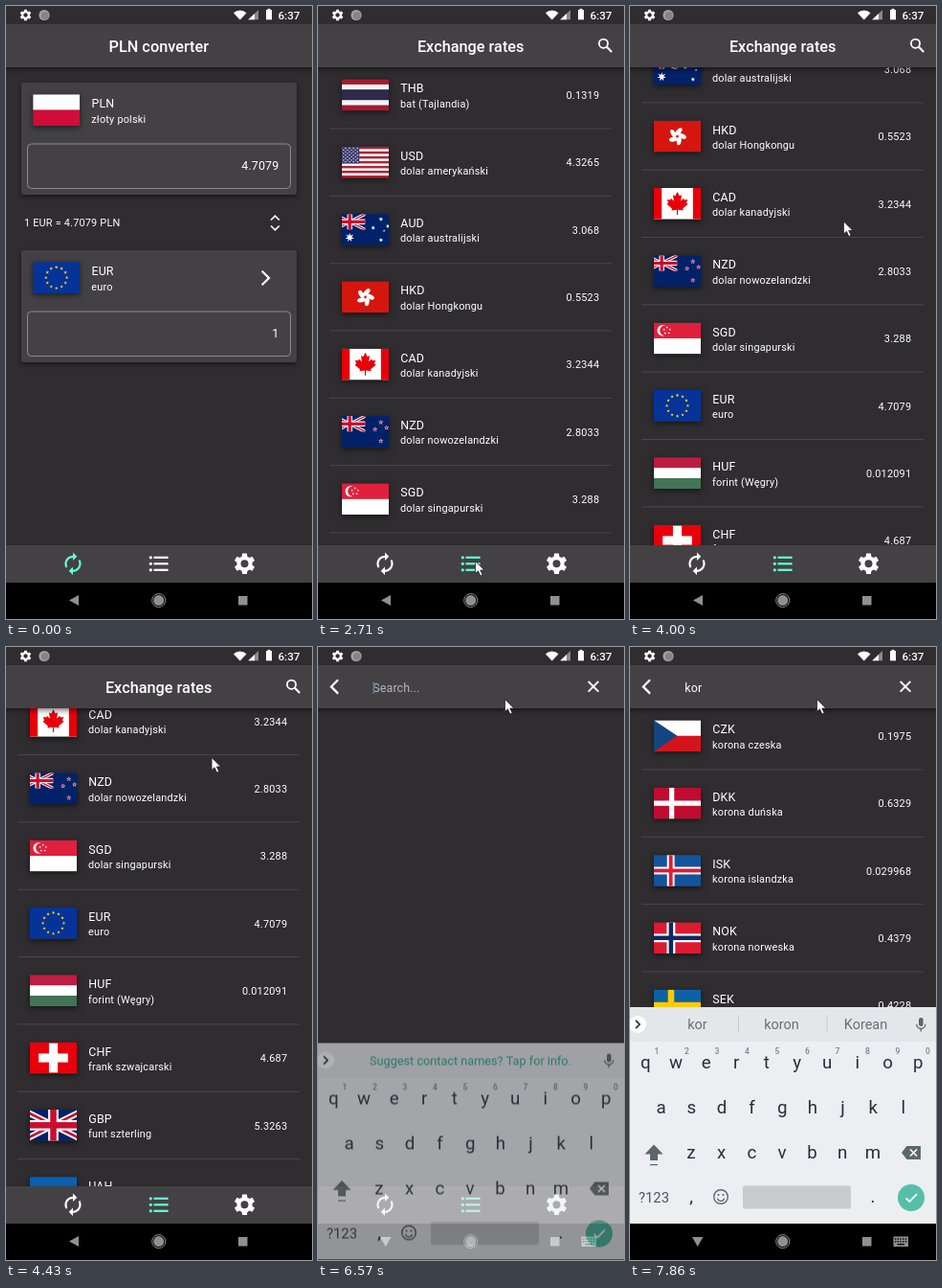
An HTML page with a canvas for the animation above (8 s loop, 320 by 640 pixels).

```html
<!DOCTYPE html>
<html lang="en">
<head>
<meta charset="utf-8">
<title>Currency converter</title>
<style>
html, body { margin: 0; width: 100%; height: 100%; overflow: hidden; background: #2f2d30; }
canvas { display: block; width: 320px; height: 640px; }
</style>
</head>
<body>
<canvas id="stage"></canvas>
<script>
const ratio = window.devicePixelRatio || 1;
function prepare(canvas) {
  canvas.width = 320 * ratio;
  canvas.height = 640 * ratio;
  const context = canvas.getContext('2d');
  context.scale(ratio, ratio);
  return context;
}
const layer = prepare(document.createElement('canvas'));
let ctx = prepare(document.getElementById('stage'));

const BG = '#2f2d30', PANEL = '#434143', ACCENT = '#64ffda', SOFT = '#b7b6b7', GREY = '#909090';
const DURATION = 8000, FPS = 7;

// Drawing helpers
function rect(x, y, w, h, color) {
  ctx.fillStyle = color;
  ctx.fillRect(x, y, w, h);
}
function roundRect(x, y, w, h, r, fill, stroke) {
  ctx.beginPath();
  ctx.roundRect(x, y, w, h, r);
  if (fill) { ctx.fillStyle = fill; ctx.fill(); }
  if (stroke) { ctx.strokeStyle = stroke; ctx.lineWidth = 1; ctx.stroke(); }
}
function disc(x, y, r, color) {
  ctx.beginPath();
  ctx.arc(x, y, r, 0, 7);
  ctx.fillStyle = color;
  ctx.fill();
}
function ring(x, y, r, width, color) {
  ctx.beginPath();
  ctx.arc(x, y, r, 0, 7);
  ctx.strokeStyle = color;
  ctx.lineWidth = width;
  ctx.stroke();
}
function trace(points) {
  ctx.beginPath();
  points.forEach(([x, y]) => ctx.lineTo(x, y));
}
function poly(points, color) {
  trace(points);
  ctx.closePath();
  ctx.fillStyle = color;
  ctx.fill();
}
function line(points, width, color = '#fff') {
  trace(points);
  ctx.strokeStyle = color;
  ctx.lineWidth = width;
  ctx.stroke();
}
function text(s, x, y, size, color = '#fff', align = 'left', weight = 400, spacing = 0) {
  ctx.font = `${weight} ${size}px Roboto, sans-serif`;
  ctx.letterSpacing = spacing + 'px';
  ctx.textAlign = align;
  ctx.fillStyle = color;
  ctx.fillText(s, x, y);
}
const bodyText = (s, x, y, color, align) => text(s, x, y, 12.45, color, align, 400, .12);
const smallText = (s, x, y, color, align) => text(s, x, y, 10.9, color, align, 400, .2);

function clipped(x, y, w, h, draw) {
  ctx.save();
  ctx.beginPath();
  ctx.rect(x, y, w, h);
  ctx.clip();
  draw();
  ctx.restore();
}
function shadowed(blur, draw) {
  ctx.save();
  ctx.shadowColor = 'rgba(0,0,0,.55)';
  ctx.shadowBlur = blur * ratio;
  ctx.shadowOffsetY = 2 * ratio;
  draw();
  ctx.restore();
}
// Draws a group opaquely, then blends it as a whole
function blended(alpha, dy, draw) {
  if (!alpha) return;
  const main = ctx;
  ctx = layer;
  ctx.clearRect(0, 0, 320, 640);
  draw();
  ctx = main;
  ctx.globalAlpha = alpha;
  ctx.drawImage(layer.canvas, 0, dy, 320, 640);
  ctx.globalAlpha = 1;
}
function star(x, y, r, tips, color, inner = .42) {
  poly(Array.from({ length: tips * 2 }, (_, i) => {
    const a = i * Math.PI / tips - Math.PI / 2, d = i % 2 ? r * inner : r;
    return [x + d * Math.cos(a), y + d * Math.sin(a)];
  }), color);
}

// Keys are [time, ...values]
function tween(keys, t) {
  if (t <= keys[0][0]) return keys[0].slice(1);
  for (let i = 1; i < keys.length; i++) {
    const [a, b] = [keys[i - 1], keys[i]];
    if (t <= b[0]) {
      const p = (t - a[0]) / (b[0] - a[0]);
      return a.slice(1).map((v, j) => v + (b[j + 1] - v) * p);
    }
  }
  return keys[keys.length - 1].slice(1);
}

// Flags fill a 48 x 32 box; wider or taller ones are cropped evenly
const W = 48, H = 32, FLAG_SCALE = 49 / W;
const bands = (...colors) => () =>
  colors.forEach((c, i) => rect(0, i * H / colors.length, W, H / colors.length + .1, c));
const nordic = (center, base, ...crosses) => () => {
  rect(0, 0, W, H, base);
  for (const [w, color] of crosses) {
    rect(center - w / 2, 0, w, H, color);
    rect(0, (H - w) / 2, W, w, color);
  }
};
function unionJack(x, w, h) {
  ctx.save();
  ctx.translate(x, 0);
  clipped(0, 0, w, h, () => {
    rect(0, 0, w, h, '#012169');
    for (const [size, color] of [[.2, '#fff'], [.08, '#c8102e']]) {
      line([[0, 0], [w, h]], h * size, color);
      line([[w, 0], [0, h]], h * size, color);
    }
    for (const [size, color] of [[.33, '#fff'], [.2, '#c8102e']]) {
      rect(0, h * (1 - size) / 2, w, h * size, color);
      rect((w - h * size) / 2, 0, h * size, h, color);
    }
  });
  ctx.restore();
}
const southern = draw => () => {
  rect(0, 0, W, H, '#012169');
  unionJack(-8, 32, 16);
  draw();
};
const flags = {
  PLN: bands('#fff', '#d00c38'),
  THB: bands('#a51931', '#f4f5f8', '#2d2a4a', '#2d2a4a', '#f4f5f8', '#a51931'),
  USD() {
    for (let i = 0; i < 13; i++) rect(0, i * H / 13, W, H / 13 + .1, i % 2 ? '#fff' : '#b22234');
    rect(0, 0, 17.9, H * 7 / 13, '#3c3b6e');
    for (let r = 0; r < 9; r++)
      for (let c = r % 2; c < 11; c += 2) disc(-4.4 + c * 2.03, 1.7 + r * 1.73, .65, '#fff');
  },
  AUD: southern(() => {
    star(8, 24, 4.8, 7, '#fff');
    [[40, 5.3], [32, 14.2], [47.1, 12.4], [40, 26.7]].forEach(([x, y]) => star(x, y, 2.3, 7, '#fff'));
    star(43.2, 17.3, 1.3, 5, '#fff');
  }),
  HKD() {
    rect(0, 0, W, H, '#d5160f');
    for (let i = 0; i < 5; i++) {
      const a = i * Math.PI * .4 - 1.3;
      ctx.beginPath();
      ctx.ellipse(24 + 5 * Math.cos(a), 16 + 5 * Math.sin(a), 4.5, 2.3, a + .5, 0, 7);
      ctx.fillStyle = '#fff';
      ctx.fill();
    }
  },
  CAD() {
    rect(0, 0, W, H, '#fff');
    rect(0, 0, 8, H, '#e8000b');
    rect(40, 0, 8, H, '#e8000b');
    const half = [[0, -12], [2.2, -7.8], [4.5, -9], [3.5, -2.5], [6.5, -5.5], [7.2, -3.8], [10.5, -4.3],
      [9.3, -.8], [10.8, .5], [5.5, 5], [6, 7], [.6, 6.3], [.6, 11.5]];
    const mirrored = half.map(([x, y]) => [-x, y]).reverse();
    poly([...half, ...mirrored].map(([x, y]) => [24 + x, 16 + y]), '#e8000b');
  },
  NZD: southern(() => {
    for (const [x, y] of [[40, 6.3], [34, 13.6], [45.8, 12], [40, 25.6]]) {
      star(x, y, 2.6, 5, '#fff');
      star(x, y, 1.8, 5, '#cc142b');
    }
  }),
  SGD() {
    bands('#e0203c', '#fff')();
    disc(9, 8, 5.6, '#fff');
    disc(11.2, 8, 5.2, '#e0203c');
    for (let i = 0; i < 5; i++) {
      const a = i * Math.PI * .4 - Math.PI / 2;
      star(13.4 + 3.2 * Math.cos(a), 8 + 3.2 * Math.sin(a), 1.3, 5, '#fff');
    }
  },
  EUR() {
    rect(0, 0, W, H, '#063398');
    for (let i = 0; i < 12; i++) {
      const a = i * Math.PI / 6;
      star(24 + 10.7 * Math.cos(a), 16 + 10.7 * Math.sin(a), 1.8, 5, '#ffd617');
    }
  },
  HUF: bands('#bd1e40', '#fff', '#437355'),
  CHF() {
    rect(0, 0, W, H, '#e8000b');
    rect(19.5, 1, 9, 30, '#fff');
    rect(9, 11.5, 30, 9, '#fff');
  },
  GBP: () => unionJack(-8, 64, H),
  UAH: bands('#0a5fb0', '#ffd500'),
  JPY() { rect(0, 0, W, H, '#fff'); disc(24, 16, 9.6, '#bc002d'); },
  CZK() {
    bands('#fff', '#d4141c')();
    poly([[0, 0], [24, 16], [0, 32]], '#14457f');
  },
  DKK: nordic(18.2, '#c00c30', [5.2, '#fff']),
  ISK: nordic(17.3, '#12549c', [7.7, '#fff'], [3.8, '#d91f35']),
  NOK: nordic(17.5, '#dc1a30', [8.7, '#fff'], [4.4, '#10275f']),
  SEK: nordic(17.6, '#0d62a6', [6.4, '#fecb00'])
};
const rates = [
  ['THB', 'bat (Tajlandia)', '0.1319'], ['USD', 'dolar amerykański', '4.3265'],
  ['AUD', 'dolar australijski', '3.068'], ['HKD', 'dolar Hongkongu', '0.5523'],
  ['CAD', 'dolar kanadyjski', '3.2344'], ['NZD', 'dolar nowozelandzki', '2.8033'],
  ['SGD', 'dolar singapurski', '3.288'], ['EUR', 'euro', '4.7079'],
  ['HUF', 'forint (Węgry)', '0.012091'], ['CHF', 'frank szwajcarski', '4.687'],
  ['GBP', 'funt szterling', '5.3263'], ['UAH', 'hrywna (Ukraina)', '0.1474'],
  ['JPY', 'jen (Japonia)', '0.034115'], ['CZK', 'korona czeska', '0.1975'],
  ['DKK', 'korona duńska', '0.6329'], ['ISK', 'korona islandzka', '0.029968'],
  ['NOK', 'korona norweska', '0.4379'], ['SEK', 'korona szwedzka', '0.4228']
];

function currency(code, name, x, middle) {
  ctx.save();
  ctx.translate(x, middle - H * FLAG_SCALE / 2);
  ctx.scale(FLAG_SCALE, FLAG_SCALE);
  shadowed(6, () => rect(0, 0, W, H, '#333'));
  clipped(0, 0, W, H, flags[code]);
  ctx.restore();
  bodyText(code, x + 61.3, middle - 2.4);
  smallText(name, x + 61, middle + 13);
}

// Icons
function gear(x, y, r, color, hole) {
  const points = [];
  for (let k = 0; k < 6; k++)
    for (const [d, da] of [[.74, -.36], [1, -.22], [1, .22], [.74, .36]]) {
      const a = k * Math.PI / 3 - Math.PI / 2 + da;
      points.push([x + r * d * Math.cos(a), y + r * d * Math.sin(a)]);
    }
  poly(points, color);
  disc(x, y, r * .36, hole);
}
const refreshPath = new Path2D('M12 6v3l4-4-4-4v3c-4.42 0-8 3.58-8 8 0 1.57.46 3.03 1.24 4.26L6.7 14.8' +
  'c-.45-.83-.7-1.79-.7-2.8 0-3.31 2.69-6 6-6zm6.76 1.74L17.3 9.2c.44.84.7 1.79.7 2.8 0 3.31-2.69 6-6 6' +
  'v-3l-4 4 4 4v-3c4.42 0 8-3.58 8-8 0-1.57-.46-3.03-1.24-4.26z');
function refreshIcon(x, y, color) {
  ctx.save();
  ctx.translate(x, y);
  ctx.scale(1.07, 1.07);
  ctx.translate(-12, -12);
  ctx.fillStyle = color;
  ctx.fill(refreshPath);
  ctx.restore();
}
function listIcon(x, y, color) {
  for (const dy of [-6.5, 0, 6.5]) {
    disc(x - 8.6, y + dy, 1.6, color);
    rect(x - 5.4, y + dy - 1.1, 15.1, 2.2, color);
  }
}

// Screen parts
function statusBar() {
  rect(0, 0, 320, 19, BG);
  gear(20.5, 9.5, 6, '#fff', BG);
  disc(40, 9.5, 5.6, '#a5a5a5');
  disc(40.6, 9.9, 4, '#858585');
  ctx.beginPath();
  ctx.moveTo(244.7, 14.5);
  ctx.arc(244.7, 14.5, 10, -2.32, -.82);
  ctx.fillStyle = '#fff';
  ctx.fill();
  poly([[264, 4], [264, 14.3], [253.3, 14.3]], '#8a898a');
  poly([[260, 8], [260, 14.3], [253.3, 14.3]], '#fff');
  rect(272, 4, 6, 10.3, '#fff');
  rect(273.6, 2.8, 2.8, 1.5, '#fff');
  text('6:37', 307.5, 13.5, 11.7, '#fff', 'right', 500);
}
function header(title) {
  shadowed(6, () => rect(-10, 19, 340, 45, PANEL));
  if (title) text(title, 159.7, 48, 16.3, '#fff', 'center', 500);
}
function tabBar(active) {
  shadowed(4, () => rect(-10, 563, 340, 60, PANEL));
  refreshIcon(70, 582.3, active === 0 ? ACCENT : '#fff');
  listIcon(159.9, 582.3, active === 1 ? ACCENT : '#fff');
  gear(249.5, 582.3, 11, '#fff', PANEL);
}
function systemBar(keyboardOpen) {
  rect(0, 602, 320, 38, '#000');
  if (keyboardOpen) {
    poly([[65, 616], [76.5, 616], [70.7, 626]], GREY);
    rect(275.5, 615.5, 15.5, 10.5, GREY);
    for (let i = 0; i < 5; i++) {
      rect(277 + i * 2.7, 617.3, 1.5, 1.5, '#000');
      rect(277 + i * 2.7, 620, 1.5, 1.5, '#000');
    }
    rect(279.5, 623, 7.5, 1.3, '#000');
  } else poly([[76, 615], [76, 626], [66, 620.5]], GREY);
  disc(159.7, 620.6, 5.5, GREY);
  ring(159.7, 620.6, 7, 1, GREY);
  rect(243, 616, 9.5, 9.5, GREY);
}
function card(y, code, name, value) {
  shadowed(5, () => roundRect(16, y, 288, 117, 3, PANEL));
  currency(code, name, 28.2, y + 28.6);
  roundRect(22.5, y + 64, 275, 46.5, 4, null, '#8d8c8d');
  bodyText(value, 285.3, y + 91, '#fff', 'right');
}
function converterPage() {
  rect(0, 0, 320, 640, BG);
  header('PLN converter');
  card(80, 'PLN', 'złoty polski', '4.7079');
  smallText('1 EUR = 4.7079 PLN', 19, 230);
  line([[277, 223.5], [281.4, 219.2], [285.8, 223.5]], 1.7);
  line([[277, 229.5], [281.4, 233.8], [285.8, 229.5]], 1.7);
  card(255, 'EUR', 'euro', '1');
  line([[267.7, 276.8], [275, 284], [267.7, 291.2]], 2.2);
}
function rateList(items, scroll) {
  clipped(0, 64, 320, 500, () => items.forEach(([code, name, rate], i) => {
    const middle = 92.8 + i * 70.33 - scroll;
    if (middle < 0 || middle > 610) return;
    currency(code, name, 25, middle);
    smallText(rate, 294.2, middle + 4.2, '#fff', 'right');
    rect(12, middle + 34.7, 295, 1, '#49474a');
  }));
}
function ratesPage(scroll) {
  rect(0, 0, 320, 640, BG);
  rateList(rates, scroll);
  header('Exchange rates');
  ring(298.5, 39.2, 4.6, 1.8, '#fff');
  line([[301.8, 42.5], [307.2, 47.9]], 2.1);
}
function searchPage(query, caret) {
  rect(0, 0, 320, 563, BG);
  if (query) rateList(rates.filter(r => (r[0] + ' ' + r[1]).toLowerCase().includes(query)), 0);
  header();
  line([[21, 34.2], [13.8, 41.4], [21, 48.6]], 2.2);
  line([[282.7, 36], [293.3, 46.6]], 1.9);
  line([[293.3, 36], [282.7, 46.6]], 1.9);
  bodyText(query || 'Search...', 57.3, 47, query ? '#fff' : SOFT);
  if (caret) rect(query ? 59 + query.length * 6.2 : 57.5, 36.5, 1.5, 12.5, '#3f86b8');
}
function keyboard(query) {
  const ink = '#263036', dim = '#5c676d';
  rect(0, 376, 320, 226, '#eceef1');
  rect(0, 376, 320, 36, '#e4e7ea');
  disc(8, 394, 9, '#fff');
  line([[6, 389.8], [10, 394], [6, 398.2]], 1.7, ink);
  if (query) {
    const words = query === 'kor' ? ['kor', 'koron', 'Korean'] : [query, query + 'n', query + 'd'];
    words.forEach((word, i) => text(word, 70.5 + i * 88, 399, 14.5, '#647077', 'center'));
    rect(113, 384, 1, 19, '#c8cccf');
    rect(205.5, 384, 1, 19, '#c8cccf');
  } else text('Suggest contact names? Tap for info.', 159.5, 398.5, 12.7, '#20a78c', 'center');

  roundRect(302, 387, 4.6, 9, 2.3, dim);
  ctx.beginPath();
  ctx.arc(304.3, 393.8, 4.6, 0, Math.PI);
  ctx.strokeStyle = dim;
  ctx.lineWidth = 1.3;
  ctx.stroke();
  rect(303.6, 398, 1.4, 3.5, dim);

  [['qwertyuiop', 16.3, 440], ['asdfghjkl', 32.6, 487], ['zxcvbnm', 64, 534]].forEach(([row, x, y]) =>
    [...row].forEach((key, i) => text(key, x + i * 31.65, y, 18.7, ink, 'center')));
  [...'1234567890'].forEach((digit, i) => text(digit, 28 + i * 31.5, 425, 8.5, '#78838a', 'center', 500));

  poly([[25, 519.5], [34.5, 529.5], [29, 529.5], [29, 536], [21, 536], [21, 529.5], [15.5, 529.5]], dim);
  rect(21, 540, 8, 1.2, dim);
  poly([[284, 528], [289.5, 521], [304, 521], [304, 535], [289.5, 535]], dim);
  line([[293, 524.5], [300, 531.5]], 1.6);
  line([[300, 524.5], [293, 531.5]], 1.6);

  text('?123', 25, 580, 14.8, '#4b565c', 'center');
  text(',', 64, 580, 18.7, ink, 'center');
  text('.', 254, 580, 18.7, ink, 'center');
  ring(95, 574, 7.3, 1.4, dim);
  disc(92.5, 572, 1.1, dim);
  disc(97.5, 572, 1.1, dim);
  ctx.beginPath();
  ctx.arc(95, 574.8, 3.6, .2, Math.PI - .2);
  ctx.stroke();
  roundRect(118, 562.5, 113, 24, 2, '#c8cacd');
  disc(294, 575, 14, '#55bfa8');
  line([[288.5, 575.3], [292.3, 579], [300, 571.2]], 1.8);
}
function pointer(x, y) {
  ctx.save();
  ctx.translate(x + .5, y + .5);
  const shape = [[0, 0], [0, 13], [3, 10.3], [5.3, 15.5], [7.6, 14.5], [5.3, 9.5], [9.5, 9.5]];
  poly(shape, '#fff');
  line([...shape, shape[0]], .8, '#222');
  ctx.restore();
}

// Timeline
const pointerKeys = [[140, 242, 599], [1000, 164, 579], [2860, 164, 579], [3710, 226, 400], [4000, 223, 225],
  [4430, 214.5, 115], [4860, 260, 80], [5140, 299, 44], [5430, 299, 44], [5710, 294, 46], [6280, 195, 54]];
const scrollKeys = [[3710, 0], [4000, 167], [4140, 222], [4290, 265], [4430, 296.7], [4570, 313], [4860, 326]];
const fadeKeys = [[5140, 0], [5500, 1]];
const keyboardKeys = [[6290, 0, 95], [6430, .3, 72], [6571, .62, 38], [6714, .93, 8], [6857, 1, 0]];
const queryAt = t => t < 7280 ? '' : t < 7420 ? 'k' : t < 7570 ? 'ko' : 'kor';

function draw(t) {
  const query = queryAt(t), onConverter = t < 1570;
  const caret = t > 6300 && (t - 6300) % 1000 < 500;
  const [fade] = tween(fadeKeys, t);
  const [alpha, drop] = tween(keyboardKeys, t);

  if (onConverter) converterPage();
  else ratesPage(tween(scrollKeys, t)[0]);
  blended(fade, 0, () => searchPage(query, caret));
  tabBar(onConverter ? 0 : 1);
  statusBar();
  systemBar(alpha > 0);
  blended(alpha, drop, () => keyboard(query));
  if (t > 100) pointer(...tween(pointerKeys, t));
}

function tick(now) {
  const step = Math.floor(((now % DURATION) + 5) * FPS / 1000) % (DURATION * FPS / 1000);
  draw(step * 1000 / FPS + 2);
  requestAnimationFrame(tick);
}
requestAnimationFrame(tick);
</script>
</body>
</html>
```
